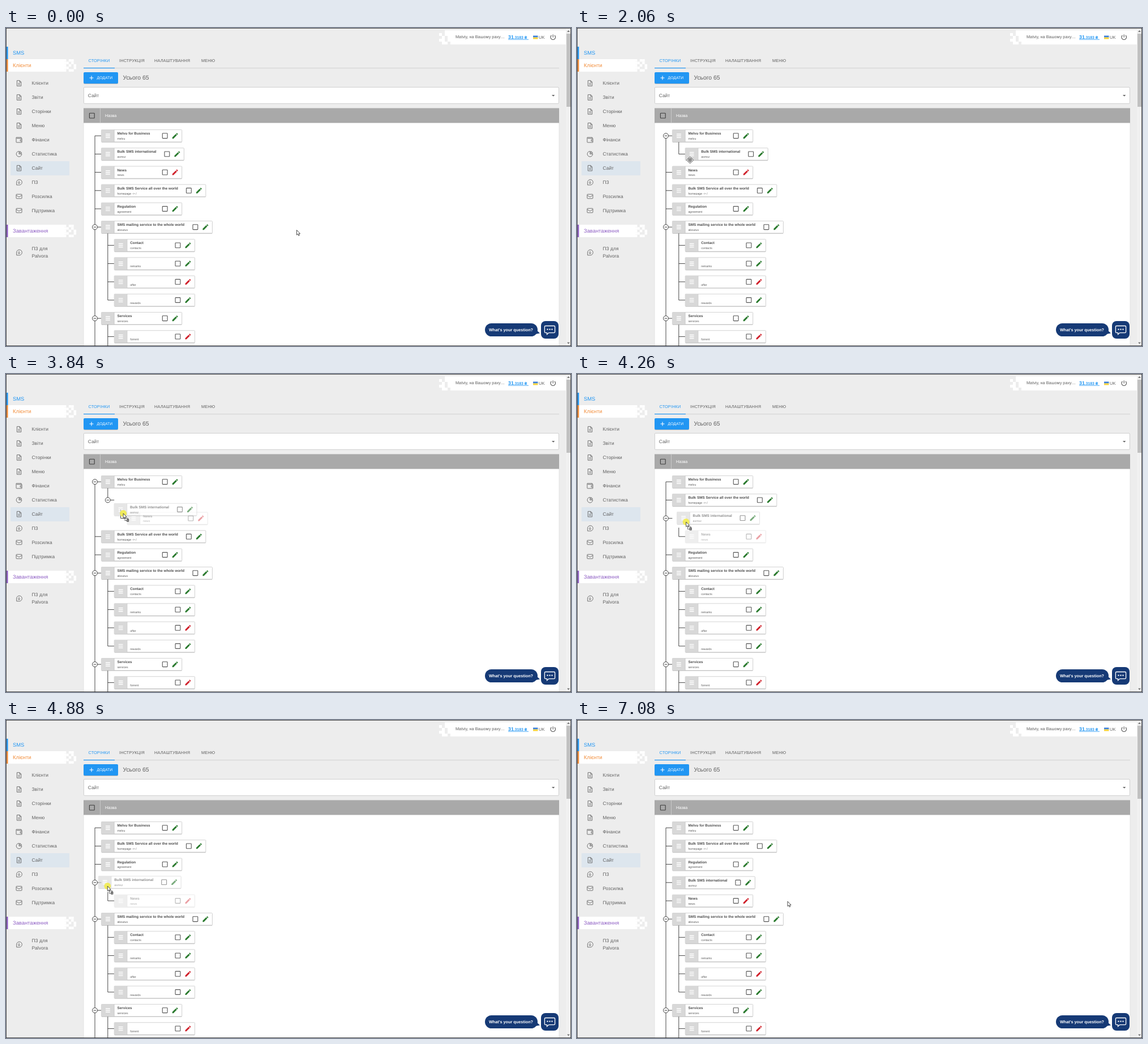
Recreate the animation shown at these times as an HTML page. Size 998 px wide and 561 px high, loop 8.01 s.

```html
<!DOCTYPE html>
<html lang="uk">
<head>
<meta charset="utf-8">
<title>Сторінки</title>
<style>
html, body { margin: 0; width: 100%; height: 100%; overflow: hidden; background: #ededed; }
svg { display: block; width: 998px; height: 561px; }
text { font-family: "Liberation Sans", Arial, sans-serif; text-rendering: geometricPrecision; white-space: pre; }
</style>
</head>
<body>
<svg id="stage" viewBox="0 0 998 561" xmlns="http://www.w3.org/2000/svg"></svg>
<script>
const LOOP = 8010;
const GREEN = '#2a7a2e', RED = '#d0212b', BLUE = '#2196f3', NAVY = '#163a76';

const rect = (x, y, w, h, fill, extra = '') =>
  `<rect x="${x}" y="${y}" width="${w}" height="${h}" fill="${fill}" ${extra}/>`;
const path = (d, stroke = '#666', width = 0.9, fill = 'none') =>
  `<path d="${d}" stroke="${stroke}" stroke-width="${width}" fill="${fill}"/>`;
// y is the middle of the capitals
const label = (x, y, str, size, fill = '#5f5f5f', extra = '') =>
  `<text x="${x}" y="${y + size * 0.36}" font-size="${size}" fill="${fill}" ${extra}>${str}</text>`;
const at = (x, y, body) => `<g transform="translate(${x} ${y})">${body}</g>`;
const box = (x, y, color) => rect(x - 4.4, y - 4.4, 8.8, 8.8, 'none', `rx="0.8" stroke="${color}" stroke-width="1.1"`);
const pixels = (x, y, size, rows) => rows.map((row, j) => [...row].map((c, i) =>
  c === '#' ? rect(x + i * size, y + j * size, size, size, '#fff') : '').join('')).join('');

const pencil = (x, y, color) =>
  `<path transform="translate(${x - 6.6} ${y - 6.6}) scale(.55)" fill="${color}" d="M3 17.25V21h3.75L17.81 9.94l-3.75-3.75zM20.71 7.04a1 1 0 0 0 0-1.41l-2.34-2.34a1 1 0 0 0-1.41 0l-1.83 1.83 3.75 3.75z"/>`;

// Sidebar icons, centred on 0,0
const icons = {
  file: path('M-3.6-4.8H1.2L3.7-2.2V4.8H-3.6ZM1-4.8V-2H3.7M-1.8 .2H1.9M-1.8 2.4H1.9'),
  wallet: path('M4-2.6V-4.3H-5V3.9Q-5 4.6-4.2 4.6H5V-2.6H-4.2M5-.4H2.2V2.2H5'),
  chart: path('M0-4.8A4.8 4.8 0 1 0 4.8 0H0ZM1.4-4.7A4.8 4.8 0 0 1 4.7-1.4H1.4Z'),
  load: path('M-4.3 4.8V0A4.8 4.8 0 1 1 0 4.8ZM0-2.6V2.2M-2 .4L0 2.4L2 .4'),
  mail: path('M-4-3.8H4Q5-3.8 5-3V3Q5 3.8 4 3.8H-4Q-5 3.8-5 3V-3Q-5-3.8-4-3.8ZM-5-2L0 1L5-2')
};

function sidebar() {
  const edge = ['#.##.', '##.#.', '#.#.#', '##..#', '#.##.'];
  const section = (y, name, color) => rect(1, y, 102, 22, '#fff') + pixels(102, y, 4.4, edge) +
    rect(1, y, 2.5, 22, color) + label(12, y + 11, name, 9.36, color);
  const menu = [['file', 'Клієнти'], ['file', 'Звіти'], ['file', 'Сторінки'], ['file', 'Меню'],
    ['wallet', 'Фінанси'], ['chart', 'Статистика'], ['file', 'Сайт'], ['load', 'ПЗ'],
    ['mail', 'Розсилка'], ['mail', 'Підтримка']];
  const item = (y, name) => label(45.5, y, name, 8.32, '#5f5f5f', 'letter-spacing=".08"');
  return rect(1, 33, 2.5, 22, BLUE) + label(12, 44, 'SMS', 9.36, BLUE) +
    section(55, 'Клієнти', '#f28c38') + rect(8, 235, 104, 25, '#dde6ee') +
    menu.map(([icon, name], i) => at(23, 97.5 + i * 24.95, icons[icon]) + item(97.3 + i * 24.95, name)).join('') +
    section(347, 'Завантаження', '#8f5fc4') +
    at(23, 396, icons.load) + item(389.3, 'ПЗ для') + item(401.8, 'Palvora');
}

function header() {
  return pixels(765, 4, 5, ['..##', '#.##', '.#.#', '##.#', '.##.']) + rect(785, 4, 204, 25, '#fff') +
    label(794, 15.4, 'Matviy, на Вашому раху…', 7.3) +
    `<text x="887" y="19" font-size="8.8" font-weight="bold" fill="${BLUE}">31<tspan font-size="6.8">.3183 ₴</tspan></text>` +
    rect(887, 19.8, 36, 0.8, BLUE) +
    rect(931, 13.5, 8.5, 3, '#3a7fd8') + rect(931, 16.5, 8.5, 3, '#f6d33c') + label(941, 16.7, 'UK', 7.5) +
    path('M963.4 13A4.3 4.3 0 1 0 969 13M966.2 11.4V16.5', '#555', 1.1);
}

function content() {
  const tabs = [[145.5, 'СТОРІНКИ', BLUE], [200, 'ІНСТРУКЦІЯ'], [262, 'НАЛАШТУВАННЯ'], [345, 'МЕНЮ']];
  return tabs.map(([x, s, c]) => label(x, 57.7, s, 7.28, c, 'letter-spacing=".2"')).join('') +
    rect(137, 70.4, 840, 0.8, '#c9c9c9') + rect(137, 70, 55, 1.2, BLUE) +
    rect(137, 79, 61, 20, '#000', 'rx="2" opacity=".2"') + rect(137, 78, 61, 20, BLUE, 'rx="2"') +
    path('M147.5 88H154.5M151 84.5V91.5', '#fff', 1.1) + label(160.5, 87.8, 'ДОДАТИ', 6.7, '#fff', 'letter-spacing=".1"') +
    label(206.5, 87.6, 'Усього 65', 10.4) +
    rect(137.4, 104.5, 839, 28.8, '#fff', 'rx="1.5" stroke="#c6c6c6" stroke-width=".8"') +
    label(144.8, 118.6, 'Сайт', 8.32) + path('M964 118H969.4L966.7 120.8Z', 'none', 0, '#666') +
    rect(137, 167, 840, 394, '#fff', 'stroke="#d6d6d6" stroke-width=".6"') +
    rect(137, 141.4, 840, 26, '#a9a9a9') + rect(166, 141.4, 0.8, 26, '#d0d0d0') +
    box(151.8, 154.6, '#3c3c3c') + label(175, 154.6, 'Назва', 7.28, '#fff');
}

function overlay() {
  return `<g fill="${NAVY}"><rect x="846" y="521" width="93" height="23" rx="11.5"/><path d="M934 530L943 538.5L930 541Z"/><rect x="945" y="517" width="31" height="31" rx="8"/></g>` +
    label(853, 532.7, 'What\'s your question?', 7.27, '#fff', 'font-weight="bold"') +
    path('M953 525.5H968Q969.6 525.5 969.6 527V536Q969.6 537.6 968 537.6H959L955.5 540.6V537.6H953Q951.4 537.6 951.4 536V527Q951.4 525.5 953 525.5Z', '#fff', 1.3) +
    [956.5, 960.5, 964.5].map(x => `<circle cx="${x}" cy="531.6" r="1.2" fill="#fff"/>`).join('') +
    rect(989, 1, 8, 559, '#f1f1f1') + rect(990, 10, 7, 129, '#c1c1c1') +
    path('M991 7H996L993.5 4ZM991 554.5H996L993.5 557.5Z', 'none', 0, '#777') +
    rect(0.4, 0.4, 997.2, 560.2, 'none', 'stroke="#2a2a2a" stroke-width=".8"');
}

// Tree rows: title, slug, width, pencil colour
const rows = {
  v: ['Melvu for Business', 'melvu', 142.3, GREEN],
  b: ['Bulk SMS international', 'asmsz', 146, GREEN],
  n: ['News', 'news', 142.3, RED],
  h: ['Bulk SMS Service all over the world', 'homepage -&gt; /', 184.5, GREEN],
  r: ['Regulation', 'agreement', 142.3, GREEN],
  a: ['SMS mailing service to the whole world', 'aboutus', 196, GREEN],
  c: ['Contact', 'contacts', 142.3, GREEN],
  m: ['', 'remarks', 142.3, GREEN],
  o: ['', 'offer', 142.3, RED],
  w: ['', 'rewards', 142.3, GREEN],
  s: ['Services', 'services', 142.3, GREEN],
  f: ['', 'forrent', 142.3, RED]
};
const TAIL = ' a0 c1 m1 o1 w1 s0 f1 x1 y0';
const layouts = [
  [0, 'v0 b0 n0 h0 r0'], [1500, 'v0 b1 n0 h0 r0'], [2500, 'v0 b1 n1 h0 r0'], [2680, 'v0 b1 n2 h0 r0'],
  [3900, 'v0 h0 b1 n2 r0'], [4190, 'v0 h0 b0 n1 r0'], [4600, 'v0 h0 r0 b0 n1'], [6330, 'v0 h0 r0 b0 n0']
];
// start, end, row, child carried along, grab point
const drags = [
  [1230, 1640, 'b', '', 185, 224.5],
  [2380, 3060, 'n', '', 181, 254.5],
  [3600, 5205, 'b', 'n', 207.3, 229.3],
  [6110, 6460, 'n', '', 208, 319]
];
// time, x, y, eased arrival
const track = [
  [190, 513.5, 356.5], [1030, 184, 224, 1], [1230, 185, 224.5], [1370, 197.5, 226.5], [1500, 207, 227],
  [1650, 210, 221], [1800, 210, 221], [2300, 181, 254.5, 1], [2380, 181, 254.5], [2610, 216, 254],
  [2836, 230.5, 254], [3300, 230.5, 254], [3600, 207.3, 229.3, 1], [4000, 207, 257], [4120, 206, 258],
  [4259, 192.7, 261], [4880, 179.3, 293], [5150, 179.3, 293], [5970, 207, 319, 1], [6040, 208, 319],
  [6110, 208, 319], [6380, 184, 318.5], [6570, 184, 319.5], [7080, 372, 320, 1]
];
// bursts of change: start, end, steps
const bursts = [
  [260, 1030, 12], [1230, 1650, 7], [1850, 2610, 11], [2680, 3070, 6], [3350, 4120, 12],
  [4190, 4880, 11], [5210, 5970, 11], [6040, 6800, 11], [6860, 7080, 4]
];

function rowBody([title, slug, w, color]) {
  return rect(0.2, -9.8, w - 0.2, 21.6, '#000', 'rx="1" opacity=".22"') +
    rect(0, -10.7, w, 21.4, '#fff', 'rx="1" stroke="#c2c2c2" stroke-width=".7"') +
    rect(0, -10.7, 22.6, 21.4, '#d8d8d8') + rect(22.4, -10.7, 0.7, 21.4, '#bdbdbd') +
    path('M7.6-2.9H15.4M7.6 .1H15.4M7.6 3.1H15.4', '#fff', 1.4) +
    label(28, -4.2, title, 6.35, '#4c4c4c', 'font-weight="bold"') + label(28, 4.9, slug, 5.25, '#5a5a5a') +
    box(w - 30, 0, '#555') + pencil(w - 12, 0, color);
}

const arrow = path('M0 0V8.6L2 6.8L3.3 9.9L4.8 9.2L3.5 6.3H6.1Z', '#222', 0.8, '#fff');
const moveArms = [0, 90, 180, 270].map(a =>
  `<path transform="rotate(${a})" d="M0-6.2L2.5-3.4H.9V-.9H-.9V-3.4H-2.5Z"/>`).join('');
const cursors = {
  arrow,
  move: `<g fill="#fff" stroke="#444" stroke-width=".8">${moveArms}<circle r="1.3"/></g>`,
  drag: '<circle r="6" fill="#f3ec3c" opacity=".8"/>' + arrow +
    rect(3, 8.6, 5.4, 4.2, '#fff', 'stroke="#333" stroke-width=".7"') + rect(6, 10, 4, 4.6, '#444') +
    path('M8 11V13.6M6.8 12.3H9.2', '#fff', 0.6)
};

const stage = document.getElementById('stage');
stage.innerHTML = sidebar() + header() + content() + '<path id="lines" fill="none" stroke="#333" stroke-width=".9"/>' +
  '<path id="knobs" fill="#fff" stroke="#333" stroke-width=".9"/><g id="tree">' +
  Object.entries(rows).map(([k, r]) => `<g id="row-${k}">${rowBody(r)}</g>`).join('') + '</g>' + overlay() +
  Object.entries(cursors).map(([k, c]) => `<g id="cur-${k}">${c}</g>`).join('');
const $ = id => document.getElementById(id);

function snap(t) {
  let q = 0;
  for (const [a, b, n] of bursts) {
    if (t < a) break;
    const step = (b - a) / (n - 1);
    q = t >= b ? b : a + Math.floor((t - a) / step + 0.01) * step;
  }
  return q;
}

function pointer(t) {
  const i = track.findIndex(k => k[0] > t);
  if (i < 1) return track[i < 0 ? track.length - 1 : 0].slice(1, 3);
  const [t0, x0, y0] = track[i - 1], [t1, x1, y1, eased] = track[i];
  let u = (t - t0) / (t1 - t0);
  if (eased) u = u * u * (3 - 2 * u);
  return [x0 + (x1 - x0) * u, y0 + (y1 - y0) * u];
}

function layout(t) {
  const order = layouts.filter(l => l[0] <= t).pop()[1] + TAIL;
  return order.split(' ').map(([key, level], i) =>
    ({ key, level: +level, x: 168.4 + 22.8 * level, y: 190.2 + 32.2 * i }));
}

function draw(t) {
  const list = layout(t), [px, py] = pointer(t);
  const drag = drags.find(d => t >= d[0] && t < d[1]);
  let lines = '', knobs = '', hover = false;
  list.forEach((row, i) => {
    const { key, level, x, y } = row;
    const spine = x - 11.4, held = drag && drag[2] === key;
    lines += `M${spine} ${y}H${x}`;
    const next = list[i + 1];
    if (next && next.level > level) {
      knobs += `M${spine - 4.5} ${y}a4.5 4.5 0 1 0 9 0a4.5 4.5 0 1 0-9 0M${spine - 2.4} ${y}h4.8`;
      let last = next;
      for (let j = i + 1; j < list.length && list[j].level > level; j++)
        if (list[j].level === level + 1) last = list[j];
      lines += `M${x + 11.4} ${y + (held ? 16.5 : 11)}V${last.y}`;
    }
    if (px >= x && px <= x + 23 && Math.abs(py - y) < 11) hover = true;
    const g = rows[key] && $('row-' + key);
    if (!g) return;
    let gx = x, gy = y, alpha = 1;
    if (held) {
      const from = layout(drag[0]).find(r => r.key === key);
      gx = from.x + px - drag[4];
      gy = from.y + py - drag[5];
      alpha = 0.62;
    } else if (drag && drag[3] === key) alpha = 0.42;
    g.setAttribute('transform', `translate(${gx} ${gy})`);
    g.setAttribute('opacity', alpha);
  });
  $('lines').setAttribute('d', lines + 'M157 190.2V561');
  $('knobs').setAttribute('d', knobs);
  if (drag && $('tree').lastChild !== $('row-' + drag[2])) $('tree').append($('row-' + drag[2]));
  const kind = drag ? 'drag' : hover ? 'move' : 'arrow';
  for (const k in cursors) $('cur-' + k).style.display = k === kind ? '' : 'none';
  $('cur-' + kind).setAttribute('transform', `translate(${px} ${py})`);
}

const start = performance.now();
let shown = -1;
function tick(now) {
  const q = snap(Math.max(0, now - start) % LOOP);
  if (q !== shown) draw(shown = q);
  requestAnimationFrame(tick);
}
draw(0);
requestAnimationFrame(tick);
</script>
</body>
</html>
```
